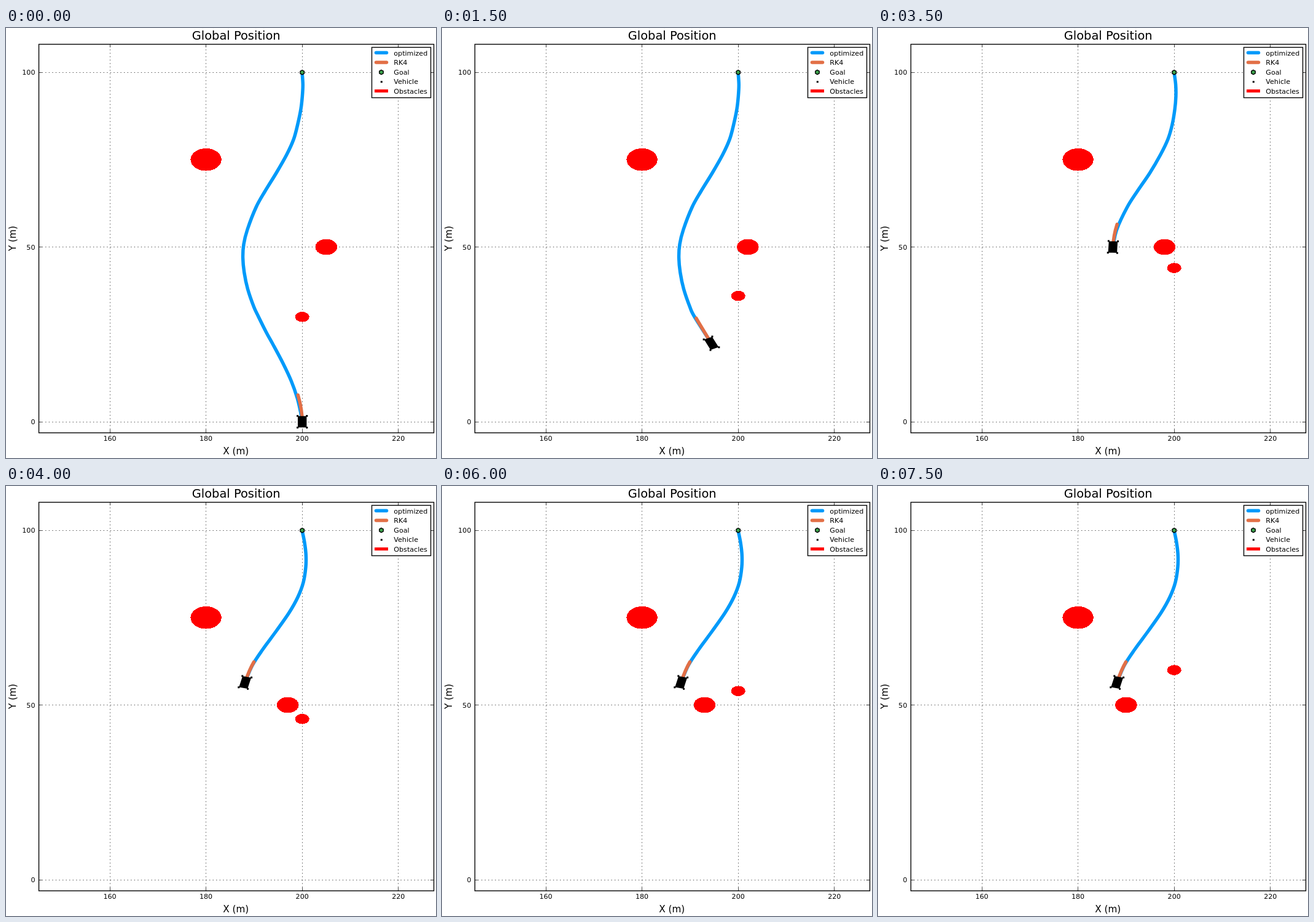
An HTML page for the animation above (8000 ms loop, 700 px wide and 700 px high).

```html
<!DOCTYPE html>
<html lang="en">
<head>
<meta charset="utf-8">
<title>Global Position</title>
<style>
  html, body { margin: 0; width: 100%; height: 100%; overflow: hidden; background: #fff; }
  svg { display: block; width: 100vw; height: 100vh; }
  text { font: 11.11px "DejaVu Sans", sans-serif; fill: #000; }
  .label { font-size: 15.28px; }
  .title { font-size: 19.44px; }
  .mid { text-anchor: middle; }
  .end { text-anchor: end; }
  .grid { stroke: #000; stroke-width: .7; stroke-dasharray: 1.39 4.17; }
  .tick { stroke: #000; stroke-width: .7; }
  .frame { fill: none; stroke: #000; stroke-width: 1.39; }
  .route { fill: none; stroke-width: 5.5; stroke-linecap: round; stroke-linejoin: round; }
  .blue { stroke: #009afa; }
  .orange { stroke: #e26f46; }
  .rock { fill: #f00; shape-rendering: crispEdges; }
  .goal { fill: #3da44d; stroke: #000; stroke-width: 1.39; }
</style>
</head>
<body>
<svg id="plot" viewBox="0 0 700 700"></svg>
<script>
const STEP = 500, STEPS = 16, LAST = 8;
const SX = 7.83, SY = 5.69;
const px = x => 482.2 + (x - 200) * SX;
const py = y => 641 - y * SY;

const plot = document.getElementById('plot');
function add(tag, attrs, text) {
  const el = document.createElementNS('http://www.w3.org/2000/svg', tag);
  for (const key in attrs) el.setAttribute(key, attrs[key]);
  if (text) el.textContent = text;
  plot.append(el);
  return el;
}
const line = (cls, x1, y1, x2, y2) => add('line', { class: cls, x1, y1, x2, y2 });
const label = (cls, x, y, text) => add('text', { class: cls, x, y }, text);
const dot = (x, y) => `M${x - 1.5} ${y - 1.5}h3v3h-3z`;

function goal(x, y) {
  const pts = [0, 1, 2, 3, 4, 5].map(i => {
    const a = i * Math.PI / 3;
    return [x + 3.7 * Math.sin(a), y - 3.7 * Math.cos(a)];
  });
  add('polygon', { class: 'goal', points: pts.join(' ') });
}

// Vehicle pose per step: x, y, heading in degrees (clockwise from up)
const poses = [
  [482.2, 641, 0], [475.3, 597.5, -11], [458, 554.5, -21], [438.5, 513.3, -24.5],
  [413.8, 472.5, -21], [395.5, 434.5, -12.5], [384.5, 394.3, -5],
  [382.4, 356.5, 2.5], [389.2, 319.7, 13.3], [403.5, 286.5, 20]
];

// Planned route as x values at shared heights
const heights = [72, 92, 112, 132, 157, 181, 206, 236, 266, 292, 328];
const early = [482, 483.3, 482.3, 480, 474.8, 468.3, 457, 440, 421.5, 407, 393];
const late = [482, 484.6, 484.9, 483.2, 479, 472, 460, 442.5, 422, 405.5, 388.7];
const final = [482, 486, 488.3, 488, 484, 475, 461, 440, 418, 401, 386];
const lower = [
  [387, 352], [385.6, 374], [387.8, 398], [393.5, 425], [403.5, 454], [411, 470],
  [424, 496], [434, 514], [451, 546], [464.5, 575], [474, 602], [479.5, 625]
];

function knots(k) {
  const mid = early.map((x, i) => (x + late[i]) / 2);
  const xs = k < 6 ? early : k === 6 ? mid : k === 7 ? late : final;
  const [vx, vy] = poses[k];
  const gap = k ? 25 : 10;
  const pts = xs.map((x, i) => [x, heights[i]]).concat(lower);
  return pts.filter(p => p[1] < vy - gap).concat([[vx, vy]]);
}

function smooth(pts) {
  const at = i => pts[Math.max(0, Math.min(pts.length - 1, i))];
  let d = 'M' + pts[0];
  for (let i = 0; i < pts.length - 1; i++) {
    const [a, b, c, e] = [at(i - 1), at(i), at(i + 1), at(i + 2)];
    const c1 = [0, 1].map(j => b[j] + (c[j] - a[j]) / 6);
    const c2 = [0, 1].map(j => c[j] - (e[j] - b[j]) / 6);
    d += `C${c1} ${c2} ${c}`;
  }
  return d;
}

// Moves a vehicle-frame offset (right, ahead) in metres to the stage
function place([x, y, deg], right, ahead) {
  const a = deg * Math.PI / 180, s = Math.sin(a), c = Math.cos(a);
  return [x + SX * (right * c + ahead * s), y - SY * (ahead * c - right * s)];
}

function forecast(k) {
  const from = poses[k], to = poses[k + 1];
  return `M${from.slice(0, 2)}Q${place(from, 0, 3.5)} ${to.slice(0, 2)}`;
}

function vehicle(pose) {
  const signs = [[-1, 1], [1, 1], [1, -1], [-1, -1]];
  const body = signs.map(([r, a]) => place(pose, r * .92, a * 1.63));
  const wheels = signs.map(([r, a]) => dot(...place(pose, r * .97, a * 1.68)));
  return 'M' + body.join('L') + 'Z' + wheels.join('');
}

const rock = (x, y, r) => add('ellipse', {
  class: 'rock', cx: px(x), cy: py(y), rx: r * SX, ry: r * SY
});

// Grid and moving parts
for (const x of [160, 180, 200, 220]) line('grid', Math.floor(px(x)) + .5, 659, Math.floor(px(x)) + .5, 26);
for (const y of [0, 50, 100]) line('grid', 53, Math.floor(py(y)) + .5, 696, Math.floor(py(y)) + .5);

const route = add('path', { class: 'route blue' });
const ahead = add('path', { class: 'route orange' });
goal(482.2, 72.2);
const car = add('path', { fill: '#000' });
rock(180, 75, 3.22);
const crossing = rock(205, 50, 2.27);
const rising = rock(200, 30, 1.46);

// Axes
add('rect', { class: 'frame', x: 53.5, y: 26.5, width: 643, height: 632.5 });
for (const x of [160, 180, 200, 220]) {
  const p = Math.floor(px(x)) + .5;
  line('tick', p, 659, p, 653.5);
  line('tick', p, 26, p, 31.5);
  label('mid', px(x), 672, String(x));
}
for (const y of [0, 50, 100]) {
  const p = Math.floor(py(y)) + .5;
  line('tick', 53, p, 58.5, p);
  line('tick', 696, p, 690.5, p);
  label('end', 47.5, py(y) + 4, String(y));
}
label('title mid', 374.7, 19, 'Global Position');
label('label mid', 374.2, 694, 'X (m)');
add('text', { class: 'label mid', transform: 'translate(16 342.5) rotate(-90)' }, 'Y (m)');

// Legend
add('rect', { x: 595.5, y: 31.5, width: 96, height: 82, fill: '#fff', stroke: '#000', 'stroke-width': 1.39 });
line('route blue', 602.5, 40.3, 619.5, 40.3);
line('route orange', 602.5, 56, 619.5, 56);
goal(611, 72);
add('path', { d: dot(611.3, 87.7) });
add('rect', { class: 'rock', x: 600, y: 100, width: 22, height: 5 });
['optimized', 'RK4', 'Goal', 'Vehicle', 'Obstacles'].forEach((name, i) => {
  label('', 631.3, 44.5 + i * 15.6, name);
});

let shown = -1;
function draw(now) {
  const step = Math.floor(now / STEP) % STEPS;
  if (step !== shown) {
    shown = step;
    const k = Math.min(step, LAST);
    route.setAttribute('d', smooth(knots(k)));
    ahead.setAttribute('d', forecast(k));
    car.setAttribute('d', vehicle(poses[k]));
    crossing.setAttribute('cx', px(205 - step));
    rising.setAttribute('cy', py(30 + 2 * step));
  }
}

const start = performance.now();
function tick() {
  draw(performance.now() - start);
  requestAnimationFrame(tick);
}
tick();
</script>
</body>
</html>
```
